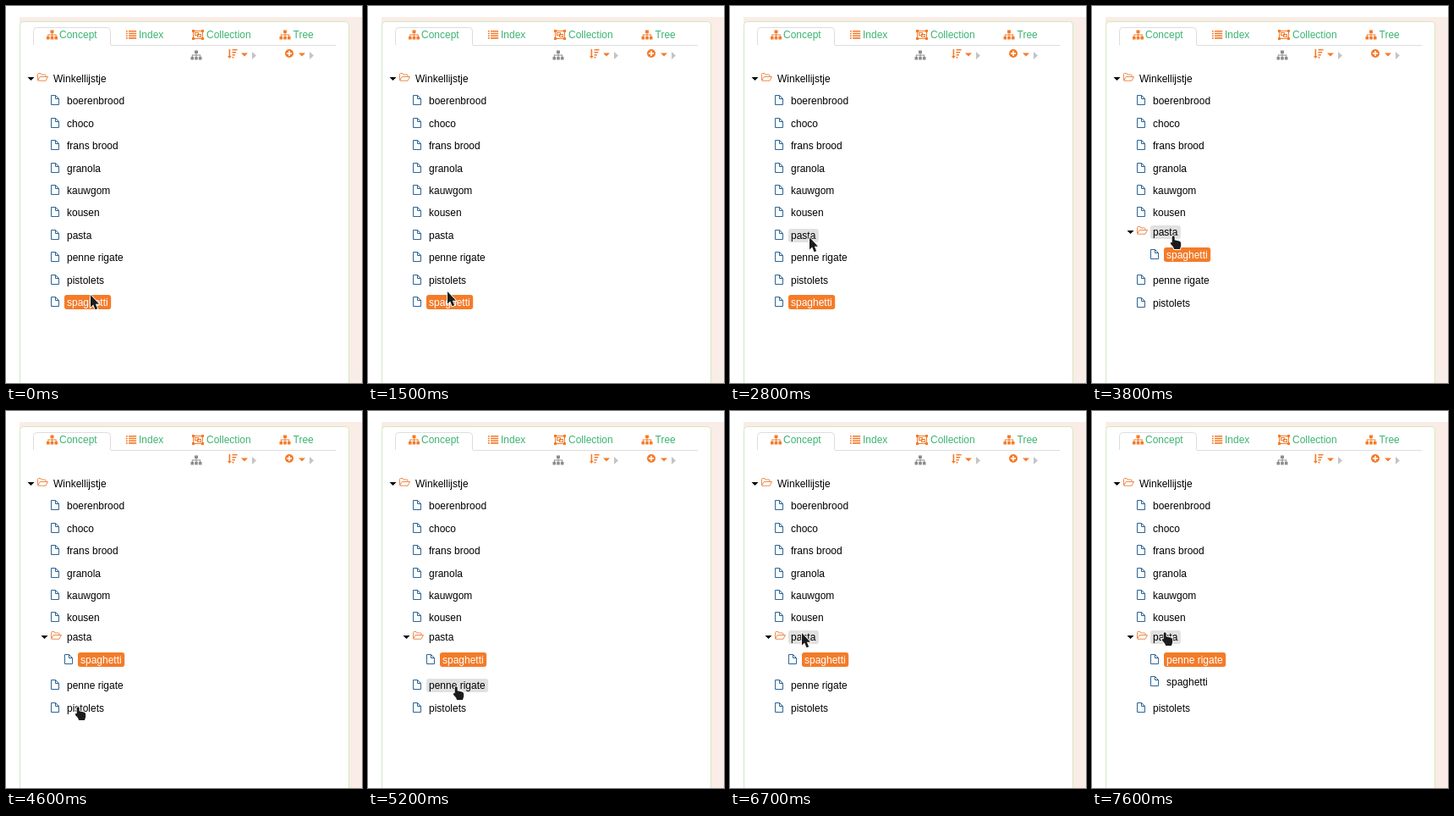
An HTML page with a canvas that plays this animation: 421 by 445 pixels, repeating every 8 s.

```html
<!DOCTYPE html>
<html lang="nl">
<head>
<meta charset="utf-8">
<title>Winkellijstje</title>
<style>
  html, body { margin: 0; height: 100%; overflow: hidden; background: #fff; }
  canvas { display: block; }
</style>
</head>
<body>
<canvas width="421" height="445"></canvas>
<script>
const ctx = document.querySelector('canvas').getContext('2d', { alpha: false });
const LOOP = 8000, STEP = 100;
const ORANGE = '#f47b29', GREEN = '#3cb371', BLUE = '#2c6595', GREY = '#e1e1e1';

const shapes = {
  arrow: 'M1 1V15.5L4.2 12.6 6.5 18.3 9.2 17.2 6.9 11.8H11Z',
  hand: 'M2.7 2.2Q4.2 .2 5.7 2.2V6.3L11.2 7.4Q13.2 8 13.2 10V13L12 17H5.2L4 14.3 .9 10.7Q.5 8.4 2.7 9.2Z',
  file: 'M.5 .5H5.5L9.5 4.5V11.5H.5ZM5.5 .5V4.5H9.5',
  open: 'M.5 8.5V1.5Q.5 .5 1.5 .5H4L5 2H9Q10 2 10 3V4.5M.6 9L3.2 4.5H12.5L10 9.2H1Z',
  closed: 'M.5 1.5Q.5 .5 1.5 .5H4L5 2H10Q11 2 11 3V8Q11 9 10 9H1.5Q.5 9 .5 8Z',
  sitemap: 'M4.5 0h4v3.5h-4zM0 7.5h3.6V11H0zM4.7 7.5h3.6V11H4.7zM9.4 7.5H13V11H9.4z' +
    'M6 3.5h1v1.6h4.7v2.4h-1V6H7v1.5H6V6H2.3v1.5h-1V5.1H6z',
  list: [0, 2.7, 5.4, 8.1].map(y => `M0 ${y}h1.8v1.6H0zM3 ${y}h9.2v1.6H3z`).join(''),
  sort: 'M1.6 0h1.6v8h1.6L2.4 11 0 8h1.6z' +
    [6, 4.7, 3.4, 2].map((w, i) => `M5.5 ${i * 3}h${w}v1.6h-${w}z`).join(''),
  caret: 'M0 0H8L4 4Z',
  next: 'M0 0L5 4.5 0 9Z'
};
for (const name in shapes) shapes[name] = new Path2D(shapes[name]);

// Pointer box: time, x, y
const track = [
  [0, 99, 340], [200, 99, 340], [600, 92, 347], [1400, 92, 347], [2000, 95, 280],
  [2300, 93, 275], [2400, 93, 274], [3000, 93, 271], [3300, 93, 271], [3400, 92, 270],
  [4100, 92, 270], [4600, 81, 348], [4800, 84, 359], [5000, 99, 323], [5100, 99, 323],
  [5200, 100, 324], [6100, 100, 324], [6700, 84, 261], [7000, 84, 261], [7600, 82, 260],
  [LOOP, 82, 260]
];
const handTimes = [[300, 1500], [3400, 6200], [7100, LOOP]];
const hovers = [
  ['pasta', 2400, 4300], ['pistolets', 4700, 4900],
  ['penne rigate', 5000, 6300], ['pasta', 6600, LOOP]
];

const within = (t, a, b) => t >= a && t < b;

function rect(x, y, w, h, fill) {
  ctx.fillStyle = fill;
  ctx.fillRect(x, y, w, h);
}

function box(x, y, w, h, radius, fill, stroke) {
  ctx.beginPath();
  ctx.roundRect(x, y, w, h, radius);
  if (fill) { ctx.fillStyle = fill; ctx.fill(); }
  if (stroke) { ctx.strokeStyle = stroke; ctx.stroke(); }
}

function shape(name, x, y, fill, stroke, width = 1) {
  ctx.save();
  ctx.translate(x, y);
  ctx.lineWidth = width;
  if (stroke) { ctx.strokeStyle = stroke; ctx.stroke(shapes[name]); }
  if (fill) { ctx.fillStyle = fill; ctx.fill(shapes[name]); }
  ctx.restore();
}

function text(str, x, y, fill) {
  ctx.fillStyle = fill;
  ctx.fillText(str, x, y);
}

function drawToolbar() {
  rect(0, 0, 421, 445, '#fff');
  rect(16, 13, 405, 432, '#faece6');
  box(16.5, 18.5, 389, 440, 4, '#fff', '#d3e8c0');

  rect(32, 46, 358, 1, '#ddd');
  box(32.5, 25.5, 91, 24, [4, 4, 0, 0], null, '#ddd');
  rect(32, 46, 92, 5, '#fff');

  shape('sitemap', 48, 28.5, ORANGE);
  shape('list', 142, 29, ORANGE);
  shape('sitemap', 323.5, 28.5, ORANGE);
  ctx.strokeStyle = ORANGE;
  ctx.strokeRect(221.5, 29.5, 11, 9);
  ctx.strokeRect(223.5, 31.5, 4, 3);
  ctx.strokeRect(226.5, 33.5, 4, 3);
  for (const x of [220, 231]) for (const y of [28, 37]) rect(x, y, 3, 3, ORANGE);
  text('Concept', 63, 38, GREEN);
  text('Index', 157, 38, GREEN);
  text('Collection', 237, 38, GREEN);
  text('Tree', 339.5, 38, GREEN);

  shape('sitemap', 218.5, 52.5, '#8c8c8c');
  shape('sort', 262, 51, ORANGE);
  shape('caret', 278, 55.5, ORANGE);
  shape('next', 291, 54, '#c4c4c4');
  box(330, 51, 10, 10, 5, ORANGE);
  rect(332, 55.2, 6, 1.6, '#fff');
  rect(334.2, 53, 1.6, 6, '#fff');
  shape('caret', 346, 55.5, ORANGE);
  shape('next', 359, 54, '#c4c4c4');
}

function label(name, x, y, selected, hovered) {
  const w = ctx.measureText(name).width + 6.5;
  if (selected) box(x - 3, y - 13, w, 17, 3, ORANGE);
  else if (hovered) box(x - 3, y - 12, w, 16, 3, GREY);
  text(name, x, y, selected ? '#fff' : '#000');
}

function folder(name, x, y, isOpen, hovered) {
  if (isOpen) shape('caret', x - 30.5, y - 6, '#000');
  else shape('next', x - 28, y - 8, '#000');
  shape(isOpen ? 'open' : 'closed', x - 19, y - 11, null, '#ee8a49');
  label(name, x, y, false, hovered);
}

function drawTree(t) {
  const hover = (hovers.find(([, a, b]) => within(t, a, b)) || [])[0];
  const selected = t < 7100 ? 'spaghetti' : 'penne rigate';
  const leaf = (name, y, x = 72) => {
    shape('file', x - 19, y - 11, null, BLUE);
    label(name, x, y, name === selected, name === hover);
  };
  const rowY = i => Math.round(116.4 + 26.4 * i);

  folder('Winkellijstje', 56, 90, true, false);
  ['boerenbrood', 'choco', 'frans brood', 'granola', 'kauwgom', 'kousen']
    .forEach((name, i) => leaf(name, rowY(i)));

  if (t < 3400) {
    ['pasta', 'penne rigate', 'pistolets', 'spaghetti']
      .forEach((name, i) => leaf(name, rowY(i + 6)));
    if (within(t, 1900, 2300)) rect(37, 279, 364, 4, '#e4e4e4');
    return;
  }
  const isOpen = t >= 3800;
  folder('pasta', 72, 271, isOpen, hover === 'pasta');
  if (t >= 7100) {
    leaf('penne rigate', 298, 88);
    leaf('spaghetti', 324, 88);
  } else {
    if (isOpen) leaf('spaghetti', 298, 88);
    leaf('penne rigate', isOpen ? 328 : 302);
  }
  leaf('pistolets', isOpen ? 355 : 328);
}

function drawPointer(t) {
  const i = track.findIndex(key => key[0] > t);
  const [t0, x0, y0] = track[i - 1], [t1, x1, y1] = track[i];
  const k = (t - t0) / (t1 - t0);
  const isHand = handTimes.some(([a, b]) => within(t, a, b));
  shape(isHand ? 'hand' : 'arrow', Math.round(x0 + (x1 - x0) * k),
    Math.round(y0 + (y1 - y0) * k), '#1c1c1c', '#fff', 1.8);
}

function frame(now) {
  const t = Math.floor(now % LOOP / STEP) * STEP;
  ctx.font = '12px "Liberation Sans", Arial, sans-serif';
  ctx.lineWidth = 1;
  drawToolbar();
  drawTree(t);
  drawPointer(t);
  requestAnimationFrame(frame);
}
requestAnimationFrame(frame);
</script>
</body>
</html>
```
